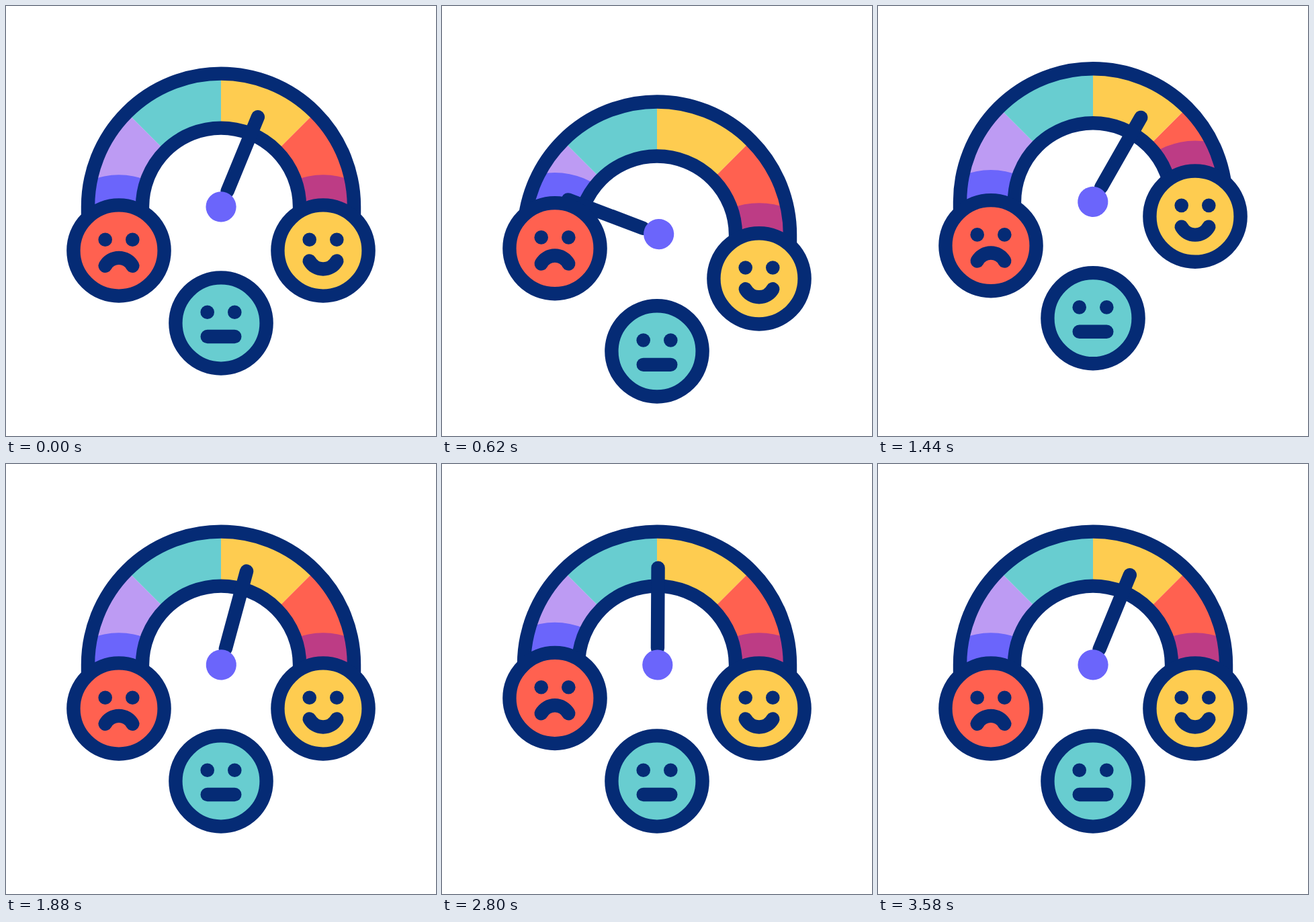
An HTML page that plays this animation: 640x640 px, repeating every 3600 ms.

```html
<!DOCTYPE html>
<html lang="en">
<head>
<meta charset="utf-8">
<title>Mood gauge</title>
<style>
  html, body { margin: 0; width: 100%; height: 100%; overflow: hidden; background: #fff; }
  svg { display: block; width: 100%; height: 100%; }
  .line { fill: none; stroke: #052b75; stroke-width: 20.4; stroke-linecap: round; stroke-linejoin: round; }
</style>
</head>
<body>
<svg viewBox="0 0 640 640">
  <defs>
    <path id="band" d="M122 309.4V298.6A198 198 0 0 1 518 298.6V309.4L437 310.4V298.6A117 117 0 0 0 203 298.6V310.4Z"/>
    <clipPath id="bandClip"><use href="#band"/></clipPath>
    <g id="eyes" fill="#052b75"><circle cx="-20.3" cy="-16.3" r="10.3"/><circle cx="20.3" cy="-16.3" r="10.3"/></g>
    <circle id="ring" r="67.6" class="line" style="fill:inherit"/>
  </defs>
  <g id="gauge">
    <g clip-path="url(#bandClip)">
      <path fill="#bd9bf3" d="M320 298.6L100 78.6V330H320Z"/>
      <path fill="#68cdd0" d="M320 298.6L100 78.6H320Z"/>
      <path fill="#fecc50" d="M320 298.6L540 78.6H320Z"/>
      <path fill="#ff6150" d="M320 298.6L540 78.6V330H320Z"/>
      <g class="sad"><circle cx="168" cy="364" r="112.7" fill="#6b65fb"/></g>
      <g class="happy"><circle cx="472" cy="364" r="112.7" fill="#bd3c85"/></g>
    </g>
    <use href="#band" class="line"/>
    <g id="needle">
      <path class="line" d="M0-23V-142.4"/>
      <circle cy="2" r="22.6" fill="#6b65fb"/>
    </g>
    <g class="sad"><g transform="translate(168 364)">
      <use href="#ring" fill="#ff6150"/><use href="#eyes"/>
      <path class="line" d="M-20.3 22.8A23.2 23.2 0 0 1 20.3 22.8"/>
    </g></g>
    <g class="happy"><g transform="translate(472 364)">
      <use href="#ring" fill="#fecc50"/><use href="#eyes"/>
      <path class="line" d="M-20.3 15.5A23.2 23.2 0 0 0 20.3 15.5"/>
    </g></g>
    <g transform="translate(320 472)">
      <use href="#ring" fill="#68cdd0"/><use href="#eyes"/>
      <path class="line" d="M-20.3 20H20.3"/>
    </g>
  </g>
</svg>
<script>
const LOOP = 3600, BOUNCE = 53.5, REST = 22.3, REACH = 70;
let time = 0;

// Eased step from 0 to 1 between two moments (ms).
function ramp(start, end) {
  const u = Math.min(1, Math.max(0, (time - start) / (end - start)));
  return u * u * (3 - 2 * u);
}

// 0 to 1 and back to 0.
const hop = (start, peak, end) => ramp(start, peak) - ramp(peak, end);

// 0 to low, on to high, and back to 0.
const swing = (low, high, start, atLow, atHigh, end) =>
  low * hop(start, atLow, atHigh) + high * hop(atLow, atHigh, end);

const needleSwing = (...times) => swing(-REACH - REST, REACH - REST, ...times);

function move(selector, y, x = 0, angle = 0) {
  for (const el of document.querySelectorAll(selector))
    el.setAttribute('transform', `translate(${x} ${y}) rotate(${angle})`);
}

function draw(now) {
  time = now % LOOP;
  const angle = REST + needleSwing(200, 600, 1092, 1556) + needleSwing(1760, 2470, 3130, 3580);
  // The sad face stays almost still on the stage while the gauge bounces.
  const lag = swing(-BOUNCE, BOUNCE, 200, 511, 1047, 1430) - 3.3 * hop(200, 600, 1430);
  move('#gauge', swing(BOUNCE, -BOUNCE, 200, 511, 1047, 1560));
  move('#needle', 297, 320.8, angle);
  move('.sad', lag - BOUNCE * hop(2270, 2640, 2890));
  move('.happy', -BOUNCE * (hop(1050, 1590, 1830) + hop(2800, 3220, 3440)));
  requestAnimationFrame(draw);
}
draw(performance.now());
</script>
</body>
</html>
```
